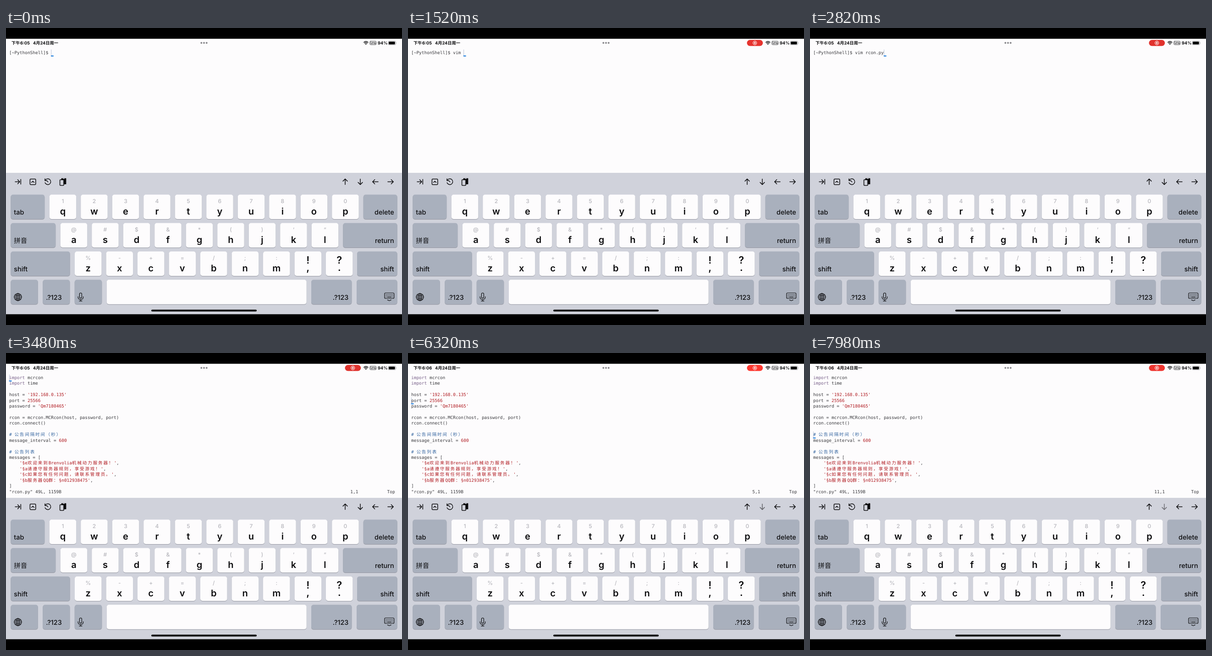
These frames come from a looping animation (864x648 px, 8 s). An HTML page:

```html
<!DOCTYPE html>
<html lang="zh-CN">
<head>
<meta charset="utf-8">
<title>Tablet terminal</title>
<style>
html, body { margin: 0; width: 100%; height: 100%; overflow: hidden; background: #000; }
svg { display: block; width: 864px; height: 648px; }
text { white-space: pre; text-rendering: geometricPrecision; font-family: Inter, "Noto Sans CJK SC", sans-serif; fill: #0c0c0e; }
.mono { font: 9.48px "DejaVu Sans Mono", "Noto Sans CJK SC", monospace; fill: #3a3a3e; }
.wide { font-family: "Noto Sans CJK SC", sans-serif; letter-spacing: 1.94px; }
.comment { fill: #3566a0; }
.value { fill: #b01a20; }
.keyword { fill: #79618a; }
.letter { font-size: 20px; font-weight: 600; text-anchor: middle; }
.mark { font-size: 22px; }
.hint { font-size: 12px; font-weight: 500; text-anchor: middle; fill: #b6b6bc; }
.label { font-size: 14.4px; font-weight: 500; }
.end { text-anchor: end; }
.status { font-size: 9.2px; font-weight: 700; }
.line { fill: none; stroke: #0c0c0e; stroke-width: 1.5; stroke-linecap: round; stroke-linejoin: round; }
</style>
</head>
<body>
<svg viewBox="0 0 864 648">
  <rect width="864" height="648"/>
  <rect y="23.5" width="864" height="292.5" fill="#fdfcfd"/>
  <rect y="316" width="864" height="308.5" fill="#d0d2db"/>

  <text class="status" x="12" y="35.8">下午</text>
  <text class="status" id="clock" x="31" y="35.8">6:05</text>
  <text class="status" x="59" y="35.8">4月24日周一</text>
  <g fill="#89898d">
    <circle cx="426.3" cy="32.6" r="2"/><circle cx="432" cy="32.6" r="2"/><circle cx="437.7" cy="32.6" r="2"/>
  </g>
  <g id="record">
    <rect id="pill" x="739.5" y="26" width="34.8" height="13.2" rx="6.6"/>
    <circle cx="756.8" cy="32.6" r="4" fill="none" stroke="#fff" stroke-width="1.1"/>
    <circle cx="756.8" cy="32.6" r="1.9" fill="#fff"/>
  </g>
  <g class="line" stroke-linecap="butt">
    <path d="M780.8 31.2q4.5-4 9 0M782.6 33.2q2.7-2.4 5.4 0"/>
    <circle cx="785.3" cy="35.2" r=".5"/>
    <rect x="794" y="29" width="13.6" height="7.4" rx="1.6" stroke-width=".8"/>
  </g>
  <text x="800.8" y="34.8" font-size="5.4" font-weight="600" text-anchor="middle">VPN</text>
  <text class="status" x="811" y="35.8">94%</text>
  <rect x="833.9" y="28.5" width="16.6" height="8.4" rx="2.3" fill="none" stroke="#99999d" stroke-width=".8"/>
  <rect x="835.1" y="29.7" width="13.6" height="6" rx="1.3"/>
  <path d="M851.5 31.2q1.4 1.5 0 3z" fill="#99999d"/>

  <g id="shell"></g>
  <g id="editor"></g>
  <g id="cursor">
    <rect x=".2" y="-6.6" width="1" height="14.6" fill="#b8c3d6"/>
    <rect y="6.4" width="5.7" height="2.1" fill="#1a7bdc"/>
  </g>

  <g class="line">
    <path d="M20 335.5h9.5M25.5 331l4.5 4.5l-4.5 4.5M32.3 330.2v10.6"/>
    <rect x="52.4" y="329.4" width="12.4" height="12.4" rx="1.6"/>
    <path d="M55.8 337l2.8-2.8l2.8 2.8"/>
    <path d="M86.2 331.4a6.4 6.4 0 1 1-1 6M85 329v4h4M91.6 335.8l-3-3"/>
    <rect x="117.6" y="331" width="8.6" height="12.4" rx="1.2"/>
    <path d="M121.4 328.4h9.2v11.8h-4.4v-9.2h-4.8z" fill="#0c0c0e"/>
    <path d="M124.4 328.6h3.2" stroke="#d0d2db" stroke-width="1"/>
  </g>
  <g id="arrows" class="line"></g>
  <g id="keys"></g>

  <g class="line" stroke-width="1.2">
    <g stroke-width="1.2" style="stroke-width:1.2">
      <circle cx="26" cy="587" r="8"/>
      <ellipse cx="26" cy="587" rx="3.9" ry="8"/>
      <path d="M26 579v16M18 587h16M19.6 582.6q6.4 2 12.8 0M19.6 591.4q6.4-2 12.8 0"/>
      <rect x="160.4" y="578" width="5" height="11.4" rx="2.5"/>
      <path d="M157.2 586v1.4a5.7 5.2 0 0 0 11.4 0V586M162.9 592.6v3M159.8 595.6h6.2"/>
      <rect x="826" y="578" width="20.6" height="12" rx="2"/>
      <path d="M829.2 581.4h14.4M829.2 584.2h14.4" stroke-dasharray=".4 2.4"/>
      <path d="M829.2 587.2h.3M832 587.2h8.6M843.2 587.2h.3M832.4 593.4l3.9 1.6l3.9-1.6"/>
    </g>
  </g>
  <rect x="317" y="614.6" width="230" height="4" rx="2"/>
</svg>
<script>
const CELL = 5.71, ROW = 12.44, LEFT = 7, BASE = 56.8;
const $ = id => document.getElementById(id);

function add(parent, tag, attrs, content = '') {
  const node = document.createElementNS(parent.namespaceURI, tag);
  for (const name in attrs) node.setAttribute(name, attrs[name]);
  node.textContent = content;
  parent.append(node);
  return node;
}

// Keyboard
function drawKey(x, y, width, plain) {
  const box = { x, width, height: 53.4, rx: 5 };
  add($('keys'), 'rect', { ...box, y: y + 1, fill: '#9698a2' });
  add($('keys'), 'rect', { ...box, y, fill: plain ? '#fdfcfd' : '#a9b0bd' });
}

function drawLabel(x, y, content, end) {
  add($('keys'), 'text', { class: end ? 'label end' : 'label', x, y: y + 43.4 }, content);
}

function drawLetters(x, y, letters, hints) {
  [...letters].forEach((letter, i) => {
    const left = x + i * 68.5, center = left + 29.2;
    const mark = '!?'.includes(hints[i]);
    drawKey(left, y, 58.5, true);
    add($('keys'), 'text', { class: mark ? 'letter mark' : 'hint', x: center, y: y + (mark ? 26 : 18) }, hints[i]);
    add($('keys'), 'text', { class: mark ? 'letter mark' : 'letter', x: center, y: y + (mark ? 42 : 43.4) }, letter);
  });
}

drawLetters(94.7, 363.5, 'qwertyuiop', '1234567890');
drawLetters(118.7, 425.5, 'asdfghjkl', '@#$&*()‘“');
drawLetters(150, 487.5, 'zxcvbnm,.', '%-+=/;:!?');
[
  [10.3, 363.5, 74, 'tab'], [779.7, 363.5, 74, 'delete', 1],
  [10.3, 425.5, 98, '拼音'], [735.3, 425.5, 118.4, 'return', 1],
  [10.3, 487.5, 129.4, 'shift'], [766, 487.5, 87.7, 'shift', 1],
  [10.3, 549.3, 59.5, ''], [80.2, 549.3, 59.2, '.?123'], [149.7, 549.3, 59.6, ''],
  [666, 549.3, 88.4, '.?123', 1], [765, 549.3, 88.7, '']
].forEach(([x, y, width, content, end]) => {
  drawKey(x, y, width, false);
  drawLabel(end ? x + width - 7 : x + 7, y, content, end);
});
drawKey(219.7, 549.3, 436, true);

const [, downArrow] = [[740, 0], [773, 180], [806, -90], [839, 90]].map(([x, angle]) =>
  add($('arrows'), 'path', {
    d: 'M0 6V-6M-4.8-1.4L0-6.2L4.8-1.4',
    transform: `translate(${x} 335.5) rotate(${angle})`
  }));

// Terminal text on a cell grid, wide characters taking two cells
function drawText(parent, row, col, content, kind = '') {
  for (const run of content.match(/[\u3000-\uffef]+|[^\u3000-\uffef]+/g) || []) {
    const wide = run[0] >= '\u3000';
    add(parent, 'text', {
      class: `mono ${kind} ${wide ? 'wide' : ''}`,
      x: LEFT + col * CELL, y: BASE + row * ROW
    }, run);
    col += run.length * (wide ? 2 : 1);
  }
  return col;
}

const source = `import mcrcon
import time

host = '192.168.0.135'
port = 25566
password = 'Qm7180465'

rcon = mcrcon.MCRcon(host, password, port)
rcon.connect()

# 公告间隔时间（秒）
message_interval = 600

# 公告列表
messages = [
    '§e欢迎来到Brenvolia机械动力服务器！',
    '§a请遵守服务器规则，享受游戏！',
    '§c如果您有任何问题，请联系管理员。',
    '§b服务器QQ群：§n012938475',
]
"rcon.py" 49L, 1159B`;

function kindOf(token) {
  if (token[0] === '#') return 'comment';
  if (/^('|\d+$)/.test(token)) return 'value';
  return token === 'import' ? 'keyword' : '';
}

source.split('\n').forEach((line, row) => {
  let col = 0;
  for (const token of line.split(/(#.*|'[^']*'|\b\d+\b|\bimport\b)/))
    col = drawText($('editor'), row, col, token, kindOf(token));
});
const ruler = add($('editor'), 'text', { class: 'mono', x: 751.3, y: BASE + 20 * ROW });
add($('editor'), 'text', { class: 'mono', x: 831.5, y: BASE + 20 * ROW }, 'Top');

const prompt = '[~PythonShell]$ ';
const command = add($('shell'), 'text', { class: 'mono', x: LEFT, y: BASE });

// Timeline, in ms
const LOOP = 8000, RECORD_ON = 500, OPEN = 3200, MINUTE = 5600;
const keyTimes = [900, 1080, 1250, 1420, 1600, 1780, 1960, 2420, 2420, 2420, 2420];
const downTimes = [4820, 5270, 5720, 6170, 6520, 6800, 7070, 7330, 7600, 7860];
const show = (node, on) => node.setAttribute('visibility', on ? 'visible' : 'hidden');

function render(time) {
  const passed = times => times.filter(at => at <= time).length;
  const editing = time >= OPEN;
  const typed = passed(keyTimes), row = passed(downTimes);

  show($('shell'), !editing);
  show($('editor'), editing);
  command.textContent = prompt + 'vim rcon.py'.slice(0, typed);
  ruler.textContent = `${row + 1},1`;
  const col = editing ? 0 : prompt.length + typed;
  $('cursor').setAttribute('transform', `translate(${LEFT + col * CELL - .3} ${53.6 + row * ROW})`);

  const sincePress = row ? time - downTimes[row - 1] : LOOP;
  downArrow.style.opacity = Math.min(1, .25 + .75 * sincePress / 350);

  $('clock').textContent = time < MINUTE ? '6:05' : '6:06';
  show($('record'), time >= RECORD_ON);
  const glow = (1 + Math.cos((time - 2120) / 2100 * 2 * Math.PI)) / 2;
  $('pill').setAttribute('fill', `rgb(${216 + 37 * glow}, ${48 + 8 * glow}, ${44 + 4 * glow})`);
}

const start = performance.now();
function tick() {
  render((performance.now() - start) % LOOP);
  requestAnimationFrame(tick);
}
tick();
</script>
</body>
</html>
```
